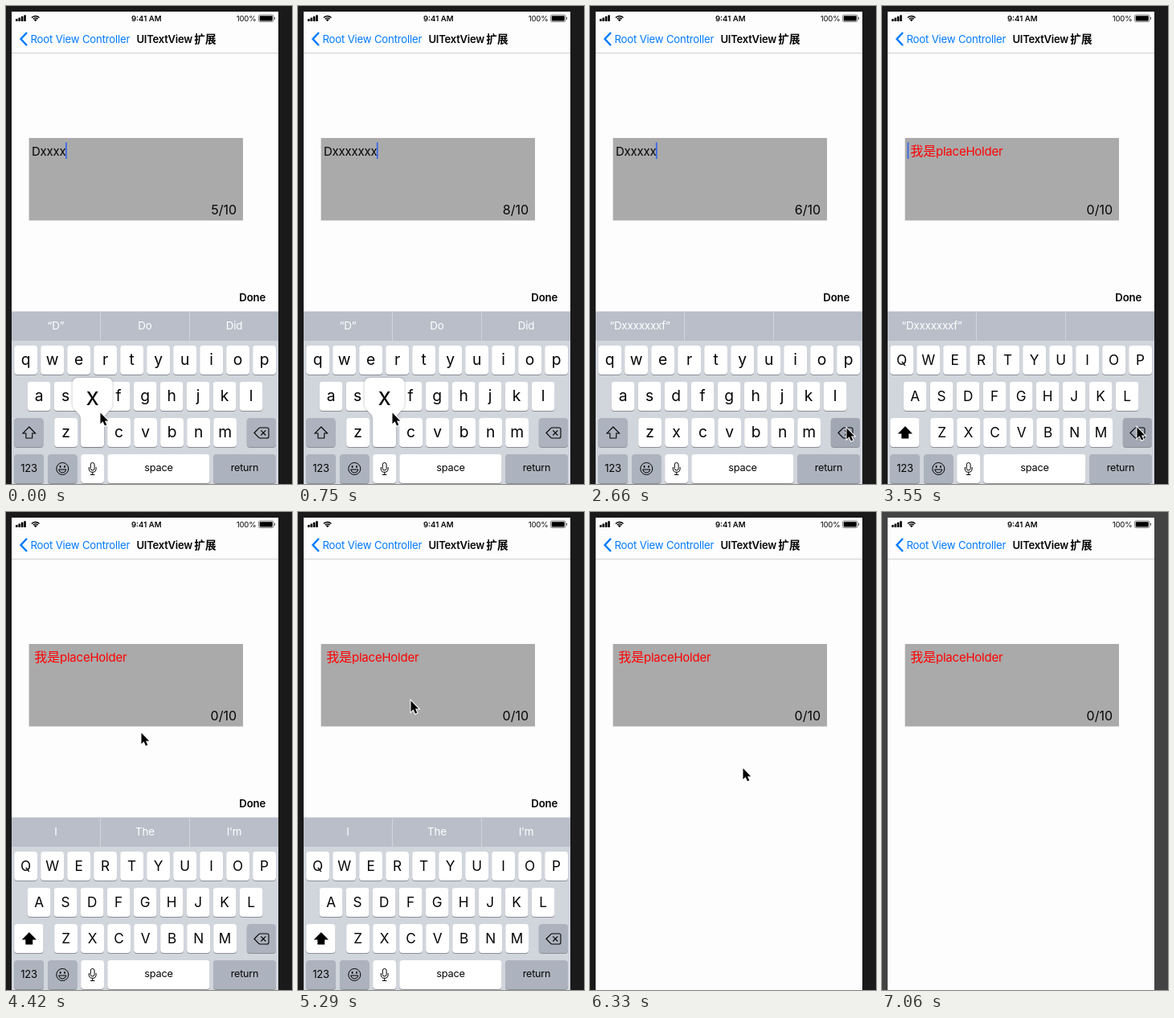
Recreate the animation shown at these times as an HTML page with a canvas. Size 356 px wide and 594 px high, loop 7160 ms.

```html
<!DOCTYPE html>
<html lang="en">
<head>
<meta charset="utf-8">
<title>Text view with counter</title>
<style>
  html, body { margin: 0; width: 100%; height: 100%; overflow: hidden; background: #1a1a1a; }
  canvas { display: block; width: 356px; height: 594px; }
</style>
</head>
<body>
<canvas></canvas>
<script>
const W = 356, H = 594, LOOP = 7160, TICK = 146.9;
const canvas = document.querySelector('canvas');
const ctx = canvas.getContext('2d');
const ratio = window.devicePixelRatio || 1;
canvas.width = W * ratio;
canvas.height = H * ratio;

const LATIN = 'Inter, sans-serif';
const CJK = '"Noto Sans CJK SC", "Noto Sans CJK JP", "Noto Sans CJK", sans-serif';
const BLUE = '#007aff', INK = '#050505', SPECIAL = '#adb3be', PRESSED = '#a1a7b3';
const TYPED = 'Dxxxxxxxff';
const ROWS = [['qwertyuiop', 10.2], ['asdfghjkl', 26.7], ['zxcvbnm', 60.2]];
const PITCH = 33, KEY_W = 28.8, KEY_H = 36;

// Pointer tip: tick, x, y
const POINTER = [
  [0, 117, 505], [5, 117, 505], [7, 140, 486], [8, 141, 487], [10, 295, 585],
  [12, 319, 526], [18, 319, 524], [24, 317, 523], [26, 317, 523], [29, 170, 278],
  [30, 168, 274], [33, 163, 266], [36, 140, 234], [40, 140, 234], [41, 140, 230],
  [42, 150, 248], [43, 190, 318], [44, 250, 430], [45, 318, 574]
];

const clamp = (v, lo, hi) => Math.min(hi, Math.max(lo, v));
const smooth = u => u * u * (3 - 2 * u);

function text(str, x, y, size, { color = INK, align = 'left', weight = 400, family = LATIN, track = -0.015 } = {}) {
  ctx.font = `${weight} ${size}px ${family}`;
  ctx.letterSpacing = `${track * size}px`;
  ctx.textAlign = align;
  ctx.fillStyle = color;
  ctx.fillText(str, x, y);
  return ctx.measureText(str).width;
}

function rect(x, y, w, h, color) {
  ctx.fillStyle = color;
  ctx.fillRect(x, y, w, h);
}

function rounded(x, y, w, h, r, color) {
  ctx.beginPath();
  ctx.roundRect(x, y, w, h, r);
  ctx.fillStyle = color;
  ctx.fill();
}

function path(d, { fill, stroke, width = 1 }) {
  const shape = new Path2D(d);
  if (stroke) {
    ctx.lineWidth = width;
    ctx.strokeStyle = stroke;
    ctx.stroke(shape);
  }
  if (fill) {
    ctx.fillStyle = fill;
    ctx.fill(shape);
  }
}

function arc(x, y, r, from, to, width, color) {
  ctx.beginPath();
  ctx.arc(x, y, r, from, to);
  ctx.lineWidth = width;
  ctx.strokeStyle = color;
  ctx.stroke();
}

function drawStatusBar() {
  for (let i = 0; i < 4; i++) rounded(12 + i * 3.4, 16 - i * 1.6, 2.6, 3 + i * 1.6, 0.6, '#000');
  for (const r of [6.6, 4.1]) arc(36.7, 19, r, -Math.PI * 0.76, -Math.PI * 0.24, 1.5, '#000');
  path('M36.7 19.3 L34.7 17.1 Q36.7 15.5 38.7 17.1 Z', { fill: '#000' });
  text('9:41 AM', 174.7, 18.6, 9.6, { align: 'center', weight: 600, track: 0 });
  text('100%', 311.5, 18.6, 9.6, { align: 'right' });
  ctx.beginPath();
  ctx.roundRect(314.4, 11, 18.6, 8.6, 2);
  ctx.lineWidth = 0.7;
  ctx.strokeStyle = '#555';
  ctx.stroke();
  rounded(315.7, 12.2, 16, 6.2, 1, '#000');
  rounded(333.8, 13.8, 1.2, 3, 0.6, '#555');
}

function drawNavigation() {
  path('M26 33 L18.5 41 L26 49', { stroke: BLUE, width: 2.4 });
  text('Root View Controller', 30.5, 45.6, 13.2, { color: BLUE });
  text('UITextView', 162.5, 45.6, 13.1, { weight: 600, track: -0.02 });
  text('扩展', 234.3, 45.8, 13.6, { weight: 700, family: CJK, track: 0 });
  rect(7, 58, 332, 0.8, '#c6c6c9');
}

function drawTextView(length, caret) {
  rect(28.6, 164, 266.4, 102.5, '#aaa');
  let width = 0;
  if (length) {
    width = text(TYPED.slice(0, length), 32, 186, 15);
  } else {
    text('我是', 35.2, 186.3, 16, { color: '#f00', family: CJK, track: 0 });
    text('placeHolder', 67, 186, 15, { color: '#f00' });
  }
  if (caret) rect(31.5 + width, 169.5, 1.8, 20.5, '#3e68e8');
  text(`${length}/10`, 287, 258.5, 16, { align: 'right', track: 0 });
}

function key(x, y, w, color = '#fff') {
  rounded(x, y + 1, w, KEY_H, 4, '#8b8e95');
  rounded(x, y, w, KEY_H, 4, color);
}

function drawShift(upper) {
  key(10.2, 512, 36.3, upper ? '#fff' : SPECIAL);
  path('M28.8 523 L36.6 531 H32.7 V537 H24.9 V531 H21 Z',
    { stroke: '#000', width: 1.1, fill: upper && '#000' });
}

function drawDelete(pressed) {
  key(299.8, 512, 36.2, pressed ? PRESSED : SPECIAL);
  path('M309 530.5 L314.5 524.8 Q315.2 524 316.3 524 H325 Q327 524 327 526 V535 Q327 537 325 537 H316.3 Q315.2 537 314.5 536.2 Z',
    { stroke: '#000', width: 1.1 });
  path('M317.3 527.4 L323.3 533.5 M323.3 527.4 L317.3 533.5', { stroke: '#000', width: 1.1 });
}

function drawBottomRow() {
  key(10.2, 557, 36.8, SPECIAL);
  text('123', 28.6, 579.4, 13, { align: 'center' });
  key(52, 557, 36.5, SPECIAL);
  arc(70.3, 575, 7.5, 0, Math.PI * 2, 1, '#000');
  for (const x of [67.6, 73]) rounded(x - 0.9, 571, 1.8, 2.8, 0.9, '#000');
  path('M65.6 576 H75 Q74 580 70.3 580 Q66.6 580 65.6 576 Z', { stroke: '#000' });
  key(93.2, 557, KEY_W);
  ctx.beginPath();
  ctx.roundRect(105.3, 567.5, 4.8, 9.5, 2.4);
  ctx.lineWidth = 1;
  ctx.stroke();
  path('M103.3 573 V575 Q103.3 579.3 107.7 579.3 Q112.1 579.3 112.1 575 V573 M107.7 579.3 V582.5 M105 582.5 H110.4',
    { stroke: '#000' });
  key(126.3, 557, 127.2);
  text('space', 190, 578.4, 12.8, { align: 'center' });
  key(258, 557, 78, SPECIAL);
  text('return', 297, 578.4, 12.6, { align: 'center' });
}

function drawPopup(letter) {
  const row = ROWS.findIndex(([letters]) => letters.includes(letter));
  const [letters, start] = ROWS[row];
  ctx.save();
  ctx.translate(start + letters.indexOf(letter) * PITCH + KEY_W / 2, 422 + row * 45);
  ctx.shadowColor = 'rgba(0,0,0,.3)';
  ctx.shadowBlur = 3 * ratio;
  path('M-25 -42 Q-25 -50 -17 -50 H17 Q25 -50 25 -42 V-18 C25 -8 14.4 -8 14.4 2 V32 Q14.4 36 10.4 36 H-10.4 Q-14.4 36 -14.4 32 V2 C-14.4 -8 -25 -8 -25 -18 Z',
    { fill: '#fff' });
  ctx.shadowColor = 'transparent';
  text(letter, 0, -16, 30, { align: 'center', track: 0 });
  ctx.restore();
}

function drawKeyboard({ upper, deleting, popup }) {
  rect(7, 416, 332, 185, '#d1d5dc');
  ROWS.forEach(([letters, start], row) => {
    [...letters].forEach((letter, i) => {
      const x = start + i * PITCH, y = 422 + row * 45;
      key(x, y, KEY_W);
      text(upper ? letter.toUpperCase() : letter, x + KEY_W / 2, y + (upper ? 24.2 : 23.6),
        upper ? 17.2 : 19.3, { align: 'center', track: 0 });
    });
  });
  drawShift(upper);
  drawDelete(deleting);
  drawBottomRow();
  if (popup) drawPopup(popup);
}

function drawSuggestions(words) {
  rect(7, 379.5, 332, 36.5, '#b9bec9');
  for (const x of [117, 228]) rect(x, 379.5, 1, 36.5, '#d1d5dc');
  words.forEach((word, i) =>
    text(word, 62 + i * 111, 401.5, 13.4, { color: '#fff', align: 'center' }));
}

function drawToolbar(y, line) {
  rect(7, y, 332, 34.5, '#fdfdfd');
  if (line) rect(7, y, 332, 0.8, '#d0d0d0');
  text('Done', 323, y + 22, 13.2, { align: 'right', weight: 600 });
}

function drawPointer(tick) {
  const next = POINTER.findIndex(([k]) => k > tick);
  const a = POINTER.at(next < 0 ? -1 : next - 1), b = POINTER.at(next);
  const u = next < 0 ? 0 : (tick - a[0]) / (b[0] - a[0]);
  ctx.save();
  ctx.translate(a[1] + (b[1] - a[1]) * u, a[2] + (b[2] - a[2]) * u);
  path('M0.5 0.5 V14.2 L3.6 11.3 L6 16.6 L8.3 15.6 L6 10.5 H10.2 Z',
    { stroke: '#fff', width: 2, fill: '#000' });
  ctx.restore();
}

function suggestionsAt(tick) {
  if (tick < 9) return ['“D”', 'Do', 'Did'];
  if (tick < 13) return ['“Dxxxxxxxff'];
  if (tick < 25) return ['“Dxxxxxxxf”'];
  return ['I', 'The', "I'm"];
}

function popupAt(tick) {
  if ([0, 2, 4, 5].includes(tick)) return 'x';
  return tick === 7 || tick === 8 ? 'f' : '';
}

function lengthAt(tick) {
  const added = [2, 4, 5, 7, 8].filter(k => tick >= k).length;
  const removed = tick < 13 ? 0 : 1 + clamp(tick - 15, 0, 9);
  return 5 + added - removed;
}

function draw(time) {
  const tick = Math.floor((time % LOOP) / TICK);
  const caret = tick < 28 || (tick >= 31 && tick < 35);
  const slide = 216 * smooth(clamp((tick - 37) * 0.46, 0, 1));

  ctx.setTransform(ratio, 0, 0, ratio, 0, 0);
  rect(0, 0, W, H, tick >= 48 ? '#434343' : '#1a1a1a');
  rect(7, 7, 332, H - 7, '#fdfdfd');
  drawStatusBar();
  drawNavigation();
  drawTextView(lengthAt(tick), caret);

  if (tick < 40) {
    const sliding = slide > 0;
    ctx.save();
    ctx.translate(0, slide);
    // The suggestion strip collapses once the keyboard leaves.
    drawToolbar(sliding ? 381 : 345, sliding);
    if (!sliding) drawSuggestions(suggestionsAt(tick));
    drawKeyboard({ upper: tick >= 24, deleting: tick >= 13 && tick < 25, popup: popupAt(tick) });
    ctx.restore();
  }
  if (tick < 46) drawPointer(tick);
}

const start = performance.now();
function loop() {
  draw(performance.now() - start);
  requestAnimationFrame(loop);
}
loop();
</script>
</body>
</html>
```
